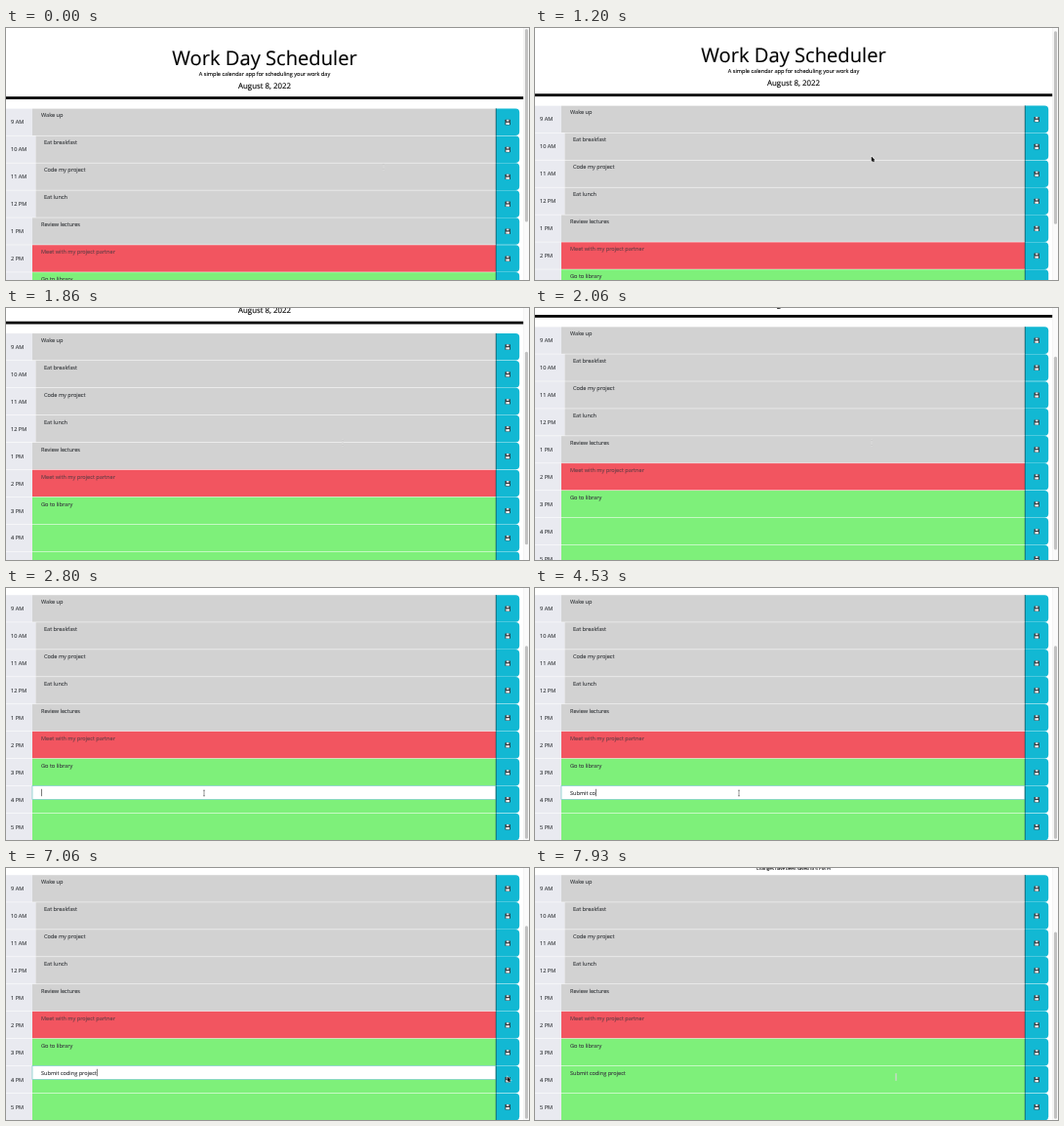
Recreate the animation shown at these times as an HTML page with a canvas. Size 536 by 258 pixels, loop 8 s.

```html
<!DOCTYPE html>
<html lang="en">
<head>
<meta charset="utf-8">
<title>Work Day Scheduler</title>
<style>
  html, body { margin: 0; width: 100%; height: 100%; overflow: hidden; background: #fff; }
  canvas { display: block; width: 536px; height: 258px; }
</style>
</head>
<body>
<canvas id="stage"></canvas>
<script>
const W = 536, H = 258, LOOP = 8000;
const ROW_H = 27.94, ROWS_TOP = 82.3, PAGE_H = 333.6, NOTICE_H = 11;
const FOCUS_AT = 2660, TYPE_FROM = 3460, TYPE_TO = 5860, SAVE_AT = 7200;
const TEXT_SIZE = 5.58, INK = '#3a3d40';
const FILL = { past: '#d2d2d2', present: '#f25560', future: '#7ef07a' };
const DRAFT = 'Submit coding project', DRAFT_ROW = 7;

const entries = ['Wake up', 'Eat breakfast', 'Code my project', 'Eat lunch',
  'Review lectures', 'Meet with my project partner', 'Go to library', '', ''];

const canvas = document.getElementById('stage');
const ctx = canvas.getContext('2d');
const dpr = window.devicePixelRatio || 1;
canvas.width = W * dpr;
canvas.height = H * dpr;
ctx.textRendering = 'geometricPrecision';

// Eased progress from 0 to 1 between two times
function glide(t, start, end) {
  const u = Math.min(1, Math.max(0, (t - start) / (end - start)));
  return u * u * (3 - 2 * u);
}

function scrollAt(t) {
  return 56.5 * glide(t, 1145, 1552) + 18.8 * glide(t, 1900, 2300);
}

function pointerAt(t) {
  const drift = glide(t, 0, 860), toRow = glide(t, 2150, 2600), nudge = glide(t, 2900, 3000);
  const toButton = glide(t, 6260, 6900), back = glide(t, 7450, 7930);
  return {
    x: 387 - 42 * drift - 142 * toRow + 6 * nudge + 305 * toButton - 144 * back,
    y: 142 - 8 * drift + 4 * glide(t, 1200, 1700) + 72 * toRow + 6 * toButton - 2 * back
  };
}

function typedText(t) {
  if (t < TYPE_FROM) return '';
  const progress = (t - TYPE_FROM) / (TYPE_TO - TYPE_FROM);
  return DRAFT.slice(0, 1 + Math.floor(progress * (DRAFT.length - 1)));
}

function rect(x, y, w, h, color) {
  ctx.fillStyle = color;
  ctx.fillRect(x, y, w, h);
}

function roundRect(x, y, w, h, radii, color) {
  ctx.beginPath();
  ctx.roundRect(x, y, w, h, radii);
  ctx.fillStyle = color;
  ctx.fill();
}

function text(str, x, y, size, color = INK, align = 'left', weight = 400) {
  ctx.font = `${weight} ${size}px "Open Sans", sans-serif`;
  ctx.textAlign = align;
  ctx.fillStyle = ctx.strokeStyle = color;
  ctx.lineWidth = 0.12;
  ctx.fillText(str, x, y);
  ctx.strokeText(str, x, y);
}

function floppy(x, y, s) {
  roundRect(x - s / 2, y - s / 2, s, s, s * 0.1, '#30363b');
  rect(x - s * 0.25, y - s / 2, s * 0.5, s * 0.33, '#d5dce0');
  rect(x - s * 0.34, y + s * 0.05, s * 0.68, s * 0.4, '#f4f4f4');
}

function drawHeader(scroll) {
  const line = (str, y, size, weight) => text(str, 265, y - scroll, size, '#000', 'center', weight);
  line('Work Day Scheduler', 37.5, 20.15);
  line('A simple calendar app for scheduling your work day', 49, TEXT_SIZE);
  line('August 8, 2022', 61.8, 7.85, 500);
  rect(0, 70.2 - scroll, 530.5, 2.8, '#000');
}

function drawEditor(y, draft) {
  rect(27, y, 475, 14, '#fff');
  ctx.strokeStyle = '#62c3c0';
  ctx.lineWidth = 0.6;
  ctx.strokeRect(27, y, 475, 14);
  ctx.font = `${TEXT_SIZE}px "Open Sans", sans-serif`;
  rect(36.1 + ctx.measureText(draft).width, y + 3.2, 0.6, 7.4, '#222');
}

function drawRow(entry, i, y, t) {
  const hour = (i + 8) % 12 + 1;
  const state = i < 5 ? 'past' : i === 5 ? 'present' : 'future';
  const wide = hour > 9;
  const left = wide ? 30.5 : 27;
  const isDraft = i === DRAFT_ROW;
  const body = isDraft ? typedText(t) : entry;

  rect(0, y, left, ROW_H, '#e9eaf0');
  rect(left, y, 502 - left, ROW_H, FILL[state]);
  rect(0, y - 0.3, 502, 0.6, 'rgba(255,255,255,0.7)');
  text(`${hour} ${i < 3 ? 'AM' : 'PM'}`, 5, y + 16.1, TEXT_SIZE);

  if (isDraft && t >= FOCUS_AT && t < SAVE_AT) drawEditor(y, body);
  text(body, wide ? 39 : 36, y + 9.1, TEXT_SIZE, state === 'present' ? '#6b3f47' : INK);

  roundRect(502, y + 0.15, 24.2, ROW_H - 0.3, [0, 4, 4, 0], '#12b8d3');
  rect(501.8, y, 0.7, ROW_H, '#14444c');
  floppy(514.2, y + 14.2, 5.4);
}

function drawScrollbar(scroll, pageH) {
  rect(530.5, 0, 5.5, H, '#fafafa');
  rect(530.5, 0, 0.4, H, '#e8e8e8');
  roundRect(531.9, 1 + scroll * H / pageH, 3.1, H * H / pageH - 2, 1.5, '#c1c1c1');
}

function strokeWithHalo(path, color) {
  ctx.strokeStyle = 'rgba(255,255,255,0.6)';
  ctx.lineWidth = 1.4;
  ctx.stroke(path);
  ctx.strokeStyle = color;
  ctx.lineWidth = 0.5;
  ctx.stroke(path);
}

function drawPointer(t) {
  const { x, y } = pointerAt(t);
  const scrolling = t > 930 && t < 1800;
  if (scrolling || x > 502) {
    const arrow = new Path2D(`M${x} ${y - 2} v4.4 l1 -.9 .8 1.6 .7 -.3 -.8 -1.6 h1.4 z`);
    strokeWithHalo(arrow, '#111');
    ctx.fillStyle = '#111';
    ctx.fill(arrow);
  } else {
    const beam = new Path2D(`M${x - 1} ${y - 2.8} h2 m-1 0 v5.6 m-1 0 h2`);
    const editing = t >= FOCUS_AT && t < SAVE_AT;
    strokeWithHalo(beam, editing ? '#333' : '#aaa');
  }
}

function draw(t) {
  const saved = t >= SAVE_AT;
  const scroll = scrollAt(t);
  const extra = saved ? NOTICE_H : 0;

  ctx.setTransform(dpr, 0, 0, dpr, 0, 0);
  rect(0, 0, W, H, '#fff');
  drawHeader(scroll + extra);
  if (saved) {
    text('Changes have been saved to 4 PM', 227, 2, 4.47, '#111');
    floppy(301, 0.4, 3.2);
  }
  entries.forEach((entry, i) => drawRow(entry, i, ROWS_TOP + i * ROW_H - scroll, t));
  drawScrollbar(scroll + extra, PAGE_H + extra);
  drawPointer(t);
}

const start = performance.now();
function tick() {
  draw((performance.now() - start) % LOOP);
  requestAnimationFrame(tick);
}
tick();
</script>
</body>
</html>
```
